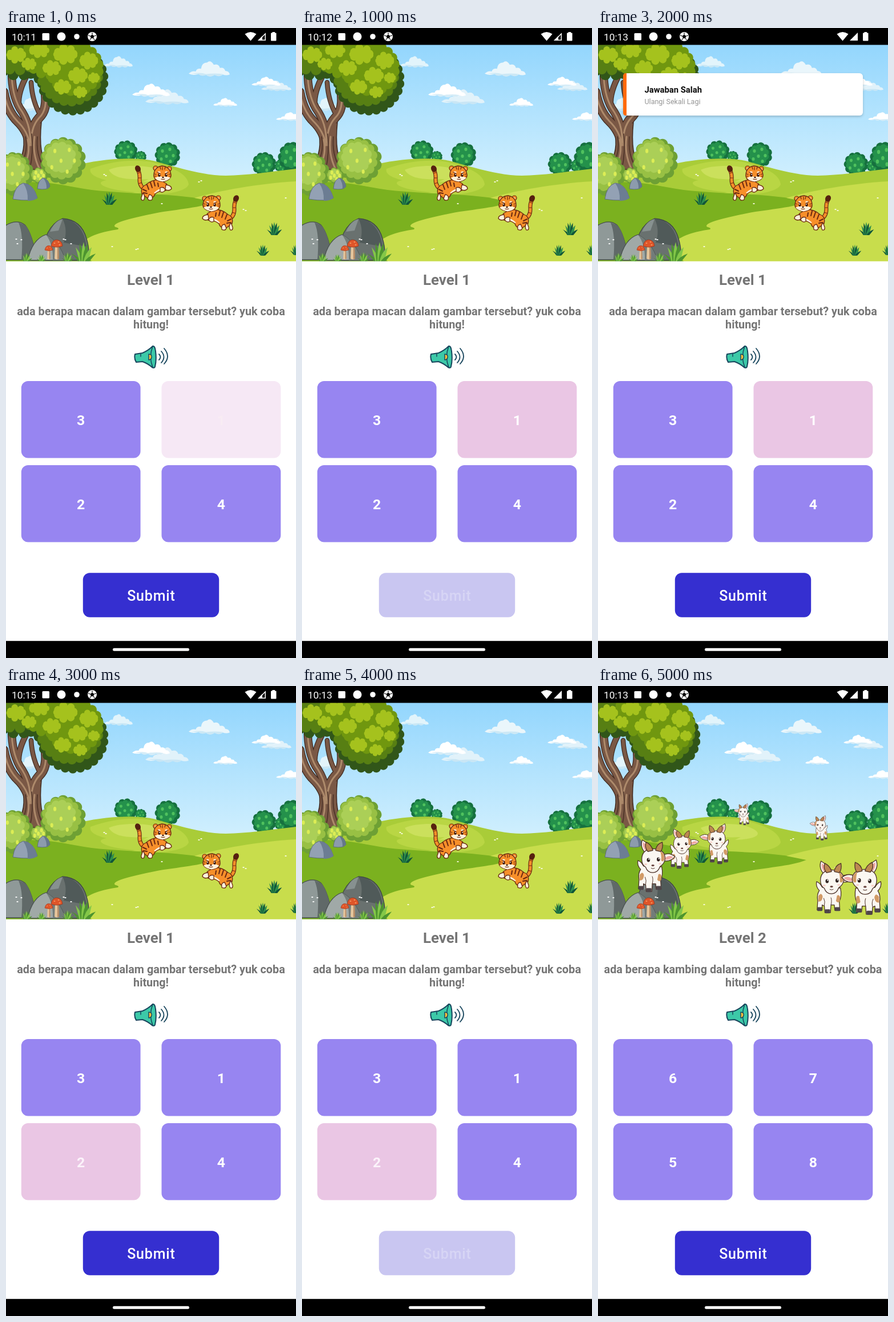
Write an HTML page that moves like this. It is 508 px wide and 1101 px high and loops after 6 s.

```html
<!DOCTYPE html>
<html lang="id">
<head>
<meta charset="utf-8">
<title>Counting quiz</title>
<style>
html, body { margin: 0; width: 100%; height: 100%; overflow: hidden; background: #fff; }
svg { display: block; width: 100%; height: 100%; font-family: Roboto, sans-serif; }
.mid { text-anchor: middle; }
.bold { font-weight: 700; }
</style>
</head>
<body>
<svg id="stage" viewBox="0 0 508 1101"></svg>
<script>
const STEP = 1000;
const VIOLET = '#9785f1', PINK = '#eac6e4';
const FIRST = {
  level: 1, animal: 'macan', answers: [3, 1, 2, 4], picked: -1, pickFill: PINK, pickText: '#fff',
  submitFill: '#352fd0', submitText: '#fff', toast: false, fullSignal: false
};
const PRESSED = { submitFill: '#c9c6f1', submitText: '#d7d5f5' };
const STATES = [
  { clock: '10:11', picked: 1, pickFill: '#f6e8f5', pickText: '#f8ecf3' },
  { clock: '10:12', picked: 1, ...PRESSED },
  { clock: '10:13', picked: 1, toast: true, fullSignal: true },
  { clock: '10:15', picked: 2, pickText: '#fbf3fa' },
  { clock: '10:13', picked: 2, pickText: '#fbf3fa', fullSignal: true, ...PRESSED },
  { clock: '10:13', level: 2, animal: 'kambing', answers: [6, 7, 5, 8], fullSignal: true }
].map(s => ({ ...FIRST, ...s }));

const path = (d, fill, extra = '') => `<path d="${d}" fill="${fill}" ${extra}/>`;
const line = (d, color, w, extra = '') =>
  path(d, 'none', `stroke="${color}" stroke-width="${w}" stroke-linecap="round" ${extra}`);
const inked = (d, fill, ink, w = 1.3) =>
  path(d, fill, `stroke="${ink}" stroke-width="${w}" stroke-linejoin="round"`);
const oval = (x, y, rx, ry, fill, extra = '') =>
  `<ellipse cx="${x}" cy="${y}" rx="${rx}" ry="${ry}" fill="${fill}" ${extra}/>`;
const ovals = (list, rx, ry, fill) => list.map(([x, y]) => oval(x, y, rx, ry, fill)).join('');
const box = (x, y, w, h, r, fill, extra = '') =>
  `<rect x="${x}" y="${y}" width="${w}" height="${h}" rx="${r}" fill="${fill}" ${extra}/>`;
const text = (x, y, size, fill, str, cls = '', extra = '') =>
  `<text x="${x}" y="${y}" font-size="${size}" fill="${fill}" class="${cls}" ${extra}>${str}</text>`;
const group = (transform, body) => `<g transform="${transform}">${body}</g>`;

// Ellipse with a scalloped, leafy edge
function leafy(x, y, rx, ry, n, fill) {
  let d = '';
  for (let i = 0; i <= n; i++) {
    const a = i / n * 2 * Math.PI;
    const p = `${(x + rx * Math.cos(a)).toFixed(1)} ${(y + ry * Math.sin(a)).toFixed(1)}`;
    const r = Math.PI * (rx + ry) / 2 / n * 1.15;
    d += i ? `A${r} ${r} 0 0 1 ${p}` : `M${p}`;
  }
  return path(d + 'Z', fill);
}

const cloud = (x, y, w, h, fill) => group(`translate(${x} ${y}) scale(${w / 100} ${h / 36})`,
  path('M0 28Q8 21 17 23Q20 15 30 17Q32 3 45 3Q53-4 61 8Q73 5 76 15Q87 13 89 22Q98 22 100 30Q91 33 83 30Q75 37 63 31Q52 38 42 31Q31 35 24 29Q10 33 0 28Z', fill) +
  path('M8 28Q30 24 42 29Q65 26 83 29Q75 37 63 31Q52 38 42 31Q31 35 24 29Z', '#b9dff2', 'opacity=".6"'));

function farTree(x, y, rx, ry) {
  const leaves = [[-.45, -.35], [.2, -.5], [.5, .05], [-.1, .1], [-.55, .35], [.25, .55]]
    .map(([u, v]) => [x + u * rx, y + v * ry]);
  return leafy(x, y, rx, ry, 11, '#16713f') + leafy(x - 1, y - 1, rx * .8, ry * .8, 10, '#24914b') +
    ovals(leaves, rx * .13, ry * .15, '#4fc15e');
}

function bush(x, y, rx, ry, n) {
  const buds = [[-.4, -.45], [.3, -.5], [.55, 0], [-.1, 0], [-.55, .3], [.2, .5]]
    .map(([u, v]) => [x + u * rx, y + v * ry]);
  return leafy(x, y, rx, ry, n, '#6ea034') + leafy(x - rx * .07, y - ry * .08, rx * .88, ry * .86, n, '#98c044') +
    leafy(x - rx * .12, y - ry * .16, rx * .68, ry * .64, n - 3, '#abcf57') + ovals(buds, 2.6, 3.8, '#dced55');
}

function tuft(x, y, s, dark = '#11563a', light = '#2f8f4c') {
  let out = '';
  for (let i = -3; i <= 3; i++) {
    const tx = i * 4.7, ty = -22 + i * i * 1.5;
    out += path(`M${i - 2.5} 2Q${tx * .5 - 3} ${ty * .6} ${tx} ${ty}Q${tx * .5 + 3} ${ty * .4} ${i + 2.5} 2Z`, i % 2 ? dark : light);
  }
  return group(`translate(${x} ${y}) scale(${s})`, out);
}

function mushroom(x, y, s) {
  return group(`translate(${x} ${y}) scale(${s})`,
    path('M-3-2L-4 22Q0 25 4 22L3-2Z', '#e5c59c') + path('M1-2L1 23L4 22L3-2Z', '#b58a65') +
    inked('M-10 0Q-8-11 0-11Q9-10 10 0Q0 4-10 0Z', '#df5529', '#92371f', .8) +
    ovals([[-4, -5], [3, -7], [5, -2]], 1.4, 1, '#f59a62'));
}

function sky() {
  return box(0, 29, 508, 240, 0, 'url(#sky)') +
    cloud(172, 49, 50, 21, '#e2f4fb') + cloud(320, 58, 72, 28, '#eaf6fb') +
    cloud(244, 107, 76, 28, '#e1f2fa') + cloud(221, 97, 66, 25, '#fff') +
    cloud(363, 122, 42, 16, '#fff') + cloud(447, 92, 53, 19, '#e1f2fa') +
    cloud(430, 85, 51, 18, '#fff') + cloud(473, 147, 50, 16, '#fff') + cloud(18, 122, 46, 24, '#e2f4fb');
}

function meadow() {
  return farTree(210, 216, 19, 17) + farTree(236, 225, 9, 9) + farTree(283, 222, 20, 20) +
    farTree(452, 238, 19, 19) + farTree(482, 241, 10, 11) + farTree(501, 225, 21, 24) +
    path('M0 262L130 238C185 226 235 226 262 233C310 247 350 258 385 258C430 257 470 250 508 246V408H0Z', '#a9cc38') +
    path('M148 246C190 231 230 229 258 235C300 245 318 258 320 273C316 287 275 294 205 293L226 287C172 283 152 270 176 266C158 262 145 255 148 246Z', '#b9d644') +
    path('M180 248C202 238 250 240 266 247C290 257 284 267 240 269L250 264C205 266 188 261 180 248Z', '#cbe05c') +
    path('M0 274C60 262 100 276 150 283C230 292 310 288 365 304L330 340L160 408H0Z', '#7bb11f') +
    path('M508 268C440 272 375 284 330 297L365 304C335 316 290 317 250 326C220 333 190 339 190 346C190 349 200 348 196 352C170 356 145 362 130 378L150 408H508Z', '#c8dd4c') +
    tuft(181, 307, .95) + tuft(470, 360, .95) + tuft(450, 396, .8) + tuft(508, 395, .75) +
    ovals([[172, 256], [175, 258], [338, 269], [342, 267], [273, 307], [416, 317], [420, 319], [186, 382], [228, 387], [231, 386], [490, 297]], 1.7, 1.1, '#fbfce9');
}

function tree() {
  const limbs = [['M42 205Q38 180 20 163Q2 145-4 112', 14], ['M42 200Q44 168 24 140Q10 115 10 78', 12],
    ['M45 205Q42 175 58 157Q74 142 68 108', 14], ['M22 136Q20 112 38 80', 8], ['M60 152Q46 128 44 95', 6]];
  const base = 'M28 178Q38 215 17 242Q28 249 42 246Q58 250 74 246Q56 222 62 165Z';
  return limbs.map(([d, w]) => line(d, '#40291f', w + 2.5)).join('') + inked(base, '#7a5845', '#40291f', 1.5) +
    limbs.map(([d, w]) => line(d, '#7a5845', w)).join('') +
    limbs.slice(0, 3).map(([d]) => line(d, '#ad8a6b', 3)).join('') +
    ['M38 195Q44 220 30 244', 'M50 190Q46 220 58 245'].map(d => line(d, '#ad8a6b', 3)).join('') +
    ['M45 185Q48 220 42 245', 'M55 190Q52 220 66 244', 'M34 190Q40 220 23 243'].map(d => line(d, '#4c3328', 1.6)).join('') +
    leafy(22, 52, 48, 31, 16, '#315619') + leafy(117, 91, 59, 58, 26, '#315619') + leafy(85, 52, 62, 44, 20, '#315619') +
    leafy(20, 47, 44, 27, 15, '#577f13') + leafy(112, 80, 55, 53, 23, '#577f13') +
    leafy(78, 48, 50, 35, 18, '#70970f') + leafy(120, 70, 48, 45, 20, '#70970f') +
    [[18, 47, 17, 10], [58, 39, 18, 8], [104, 46, 21, 12], [145, 57, 16, 11], [80, 70, 16, 9], [126, 83, 17, 10], [154, 87, 10, 7], [99, 103, 15, 9], [130, 112, 12, 7], [40, 63, 13, 7]]
      .map(([x, y, rx, ry]) => leafy(x, y, rx, ry, 9, '#a5c21d')).join('');
}

function foreground() {
  return bush(100, 232, 36, 38, 14) + bush(14, 255, 29, 36, 13) + bush(58, 258, 14, 12, 9) +
    inked('M55 281Q56 266 65 262Q75 264 77 277Q72 284 55 281Z', '#8c9bad', '#556577', .8) +
    path('M65 262Q72 270 71 282L77 277Q75 264 65 262Z', '#65778b') +
    inked('M12 299Q15 276 30 271Q48 272 55 297Q44 304 12 299Z', '#93a1b4', '#526073', .8) +
    path('M30 271Q39 283 38 302Q50 302 55 297Q48 272 30 271Z', '#6c7d93') +
    inked('M62 406Q66 346 99 333Q132 335 141 368Q149 395 141 406Z', '#69716f', '#3e4645') +
    path('M99 333Q109 354 101 375L141 382Q135 337 99 333Z', '#505a59') +
    path('M77 356Q86 336 99 334L92 354Z', '#879190') +
    inked('M-2 346Q18 333 33 344Q47 361 53 405H-2Z', '#8f9998', '#454d4c') +
    path('M22 340Q31 360 27 405H53Q46 356 33 344Z', '#606968') +
    inked('M38 406Q46 369 70 361Q94 374 104 406Z', '#a0a9a7', '#474f4e') +
    path('M70 361Q83 378 82 406H104Q94 374 70 361Z', '#737c7a') +
    tuft(136, 407, 1.5, '#4d942f', '#83c748') + tuft(36, 408, .7, '#4d942f', '#83c748') +
    tuft(62, 408, .6, '#4d942f', '#83c748') + tuft(108, 408, .75, '#4d942f', '#83c748') +
    mushroom(75, 388, .7) + mushroom(89, 381, 1) +
    ovals([[18, 369], [27, 370], [101, 369], [104, 370], [114, 377], [20, 377]], 1.7, 1.1, '#fff');
}

function tiger(transform) {
  const ink = '#6a2911', fur = '#f78f2a', cream = '#fff1dc', tail = 'M22 44Q9 39 9 25Q10 15 6 8';
  return group(transform,
    line(tail, ink, 7) + line(tail, fur, 4.6) + line(tail, ink, 4.6, 'stroke-dasharray="1 8" style="stroke-linecap:butt"') +
    oval(6, 6, 4.8, 6, '#56200f', 'transform="rotate(-25 6 6)"') +
    inked('M13 50Q10 38 20 34Q30 25 44 25L56 32Q61 39 55 44Q45 43 36 50Q34 58 24 58Z', fur, ink) +
    path('M34 48Q42 40 54 39L53 43Q44 43 36 49Z', cream) +
    inked('M15 48Q20 55 16 61Q11 62 12 56Z', cream, ink) + inked('M26 51Q33 52 31 60Q25 63 23 58Z', cream, ink) +
    inked('M45 39Q52 37 54 43Q50 49 45 46Z', cream, ink) + inked('M55 34Q65 35 65 41Q60 46 54 42Z', cream, ink) +
    ['M22 34L25 42', 'M28 30L31 39', 'M34 28L36 36', 'M15 42L21 45', 'M16 48L22 49', 'M41 31L42 37'].map(d => line(d, ink, 2)).join('') +
    ovals([[37, 5], [61, 6]], 4.6, 4.6, ink) + ovals([[37, 5], [61, 6]], 3.4, 3.4, fur) + ovals([[37.5, 6], [60.5, 7]], 2, 2, '#ffd3a8') +
    inked('M34 16Q35 3 48 1Q62 2 64 16Q65 22 58 26Q49 31 39 26Q33 22 34 16Z', fur, ink) +
    path('M36 22Q42 18 49 20Q57 18 63 22Q58 27 49 28.5Q39 27 36 22Z', cream) +
    ovals([[43, 12], [56, 12]], 2.8, 1.6, cream) + ovals([[43.5, 17], [55.5, 17]], 2.2, 3, '#40190d') +
    ovals([[44.1, 15.8], [56.1, 15.8]], .9, 1.1, '#fff') + oval(50, 21, 1.8, 1.2, '#40190d') +
    ['M49 3V8', 'M45 3L46 7', 'M54 3L53 7', 'M35 15L38 16', 'M35 19L38 19', 'M63 15L60 16', 'M63 19L61 19', 'M47 24Q50 25 53 24', 'M40 12L45 14.5', 'M59 12L54 14.5']
      .map(d => line(d, ink, 1.2)).join(''));
}

function goat(x, y, s, flip) {
  const ink = '#4b3028', tan = '#d29a66', coat = '#fbf7f1';
  return group(`translate(${flip ? x + 70 * s : x} ${y}) scale(${flip ? -s : s} ${s})`,
    inked('M8 54Q1 47 3 38Q9 40 13 48Q30 54 46 49Q49 64 44 74L45 90H36L35 80H29L28 94H18L17 82L13 80V89H4L5 73Q3 61 8 54Z', coat, ink) +
    path('M6 64Q12 56 14 65Q13 75 6 74Z', tan) + path('M40 63Q47 60 45 73Q42 78 38 73Z', tan) +
    [[4, 84], [18, 88], [36, 84]].map(([a, b]) => box(a, b, 9.5, 7, 1.5, '#4f4549')).join('') +
    line('M29 80Q31 72 29 67M17 81Q19 74 16 68', ink, 1) +
    inked('M17 25Q6 14 11 1Q22 7 26 19Z', coat, ink) + path('M18 22Q10 13 12.5 5Q20 10 23 18Z', '#efa8a3') +
    inked('M48 29Q58 22 70 31Q61 42 47 38Z', coat, ink) + path('M51 34Q60 27 67 32Q59 38 51 37Z', '#efa8a3') +
    inked('M10 36Q10 18 30 17Q52 18 52 34Q52 43 43 49Q39 60 30 60Q20 60 17 50Q10 46 10 36Z', coat, ink) +
    path('M43 21Q52 25 51 36Q48 42 45 38Q46 29 43 21Z', tan) +
    inked('M21 22Q14 14 18 5Q28 10 30 20Z', '#bd8852', ink) + inked('M35 20Q36 9 47 5Q49 16 44 22Z', '#bd8852', ink) +
    ovals([[22, 37], [40, 36]], 2.9, 3.6, '#30211f') + ovals([[23, 35.5], [41, 34.5]], 1.1, 1.3, '#fff') +
    ovals([[17, 45], [43, 44]], 2.6, 1.7, '#f9d0c8') + oval(30, 47, 2.8, 1.7, '#6a4540') + line('M27 52Q30 54 33 52', ink, 1));
}

const goats = () => goat(238, 205, .4, true) + goat(371, 226, .46, true) + goat(125, 249, .74) +
  goat(178, 240, .75, true) + goat(67, 268, .97) + goat(380, 305, .97) + goat(427, 303, 1.02, true);
const tigers = () => tiger('translate(225 240)') + tiger('translate(409 292) scale(-1 1)');

function statusBar(s) {
  const wedge = 'M455 8V22H441Z';
  return box(0, 0, 508, 29.5, 0, '#000') + text(10, 21.5, 17.3, '#fff', s.clock) +
    box(63.5, 9, 12.5, 12.5, 1.5, '#fff') + oval(97, 15, 7.5, 7.5, '#fff') + oval(124, 15, 4.8, 4.8, '#fff') +
    oval(151, 15, 8, 8, '#fff') + path('M151 11.5L154.5 14L153 18H149L147.5 14Z', '#000') +
    line('M151 8.5V11M144.5 13L147 14M157.5 13L155 14M147 20.5L149 18M155 20.5L153 18', '#000', 1.2) +
    path('M418.5 10.5Q428.5 3.5 438.5 10.5L428.5 22.5Z', '#fff') +
    (s.fullSignal ? path(wedge, '#fff') : path('M449 14V22H441Z', '#fff') + line('M454.2 10V21.3H443Z', '#fff', 1.5)) +
    box(464, 8.5, 9.5, 14, 1, '#fff') + box(466.5, 7, 4.5, 3, 0, '#fff');
}

function speaker() {
  const ink = '#17455c';
  return inked('M226 570L239 568Q249 564 257 556Q261 555 262 565Q264 580 261 592Q260 595 256 593Q248 586 239 583L228 584Q224 577 226 570Z', '#3cc9a8', ink, 2) +
    line('M236 569V574M257 556Q250 575 257 593', ink, 1.5) + inked('M250 570Q256 570 255 576Q254 580 250 580Z', '#f6bf3c', ink, 1.4) +
    ['M268 570Q273 575 268 580', 'M272 565Q281 575 272 585', 'M277 560Q289 574 277 587'].map(d => line(d, ink, 1.8)).join('');
}

function answers(s) {
  return s.answers.map((n, i) => {
    const x = 26.8 + i % 2 * 245.7, y = 617 + (i >> 1) * 147, on = i === s.picked;
    return box(x, y, 208.8, 134.5, 12, on ? s.pickFill : VIOLET) +
      text(x + 104.4, y + 77, 24.8, on ? s.pickText : '#fff', n, 'mid', 'font-weight="600"');
  }).join('');
}

const toast = () => box(44, 79, 420, 74, 6, '#fff', 'filter="url(#shadow)"') +
  path('M50 79H49Q44 79 44 84V148Q44 153 49 153H50Z', '#ff6a0a') +
  text(81.5, 112.5, 14.8, '#0b0b0b', 'Jawaban Salah', 'bold') + text(81.5, 132.5, 12.5, '#969696', 'Ulangi Sekali Lagi');

const defs = `<defs>
<linearGradient id="sky" x2="0" y2="1"><stop stop-color="#93d6fd"/><stop offset="1" stop-color="#d2f0fe"/></linearGradient>
<filter id="shadow" x="-5%" y="-20%" width="110%" height="150%"><feDropShadow dx="0" dy="2" stdDeviation="2" flood-opacity=".2"/></filter>
</defs>`;
const scenery = sky() + meadow() + tree() + foreground();

function screen(s) {
  return defs + scenery + (s.level === 1 ? tigers() : goats()) + (s.toast ? toast() : '') +
    statusBar(s) + box(0, 407.7, 508, 664, 0, '#fff') +
    text(253.5, 448.5, 25.9, '#757575', 'Level ' + s.level, 'mid bold') +
    text(254, 502, 19.8, '#757575', `ada berapa ${s.animal} dalam gambar tersebut? yuk coba`, 'mid bold') +
    text(254, 525.3, 19.8, '#757575', 'hitung!', 'mid bold') + speaker() + answers(s) +
    box(134.8, 952.3, 238.4, 77.5, 12, s.submitFill) +
    text(254.4, 1001, 25, s.submitText, 'Submit', 'mid', 'font-weight="500" letter-spacing=".8"') +
    box(0, 1071.2, 508, 30, 0, '#000') + box(187, 1083.7, 134, 5, 2.5, '#fff');
}

const stage = document.getElementById('stage');
const start = performance.now();
let shown = -1;
function tick() {
  const i = Math.floor((performance.now() - start) / STEP) % STATES.length;
  if (i !== shown) stage.innerHTML = screen(STATES[shown = i]);
  requestAnimationFrame(tick);
}
tick();
</script>
</body>
</html>
```
